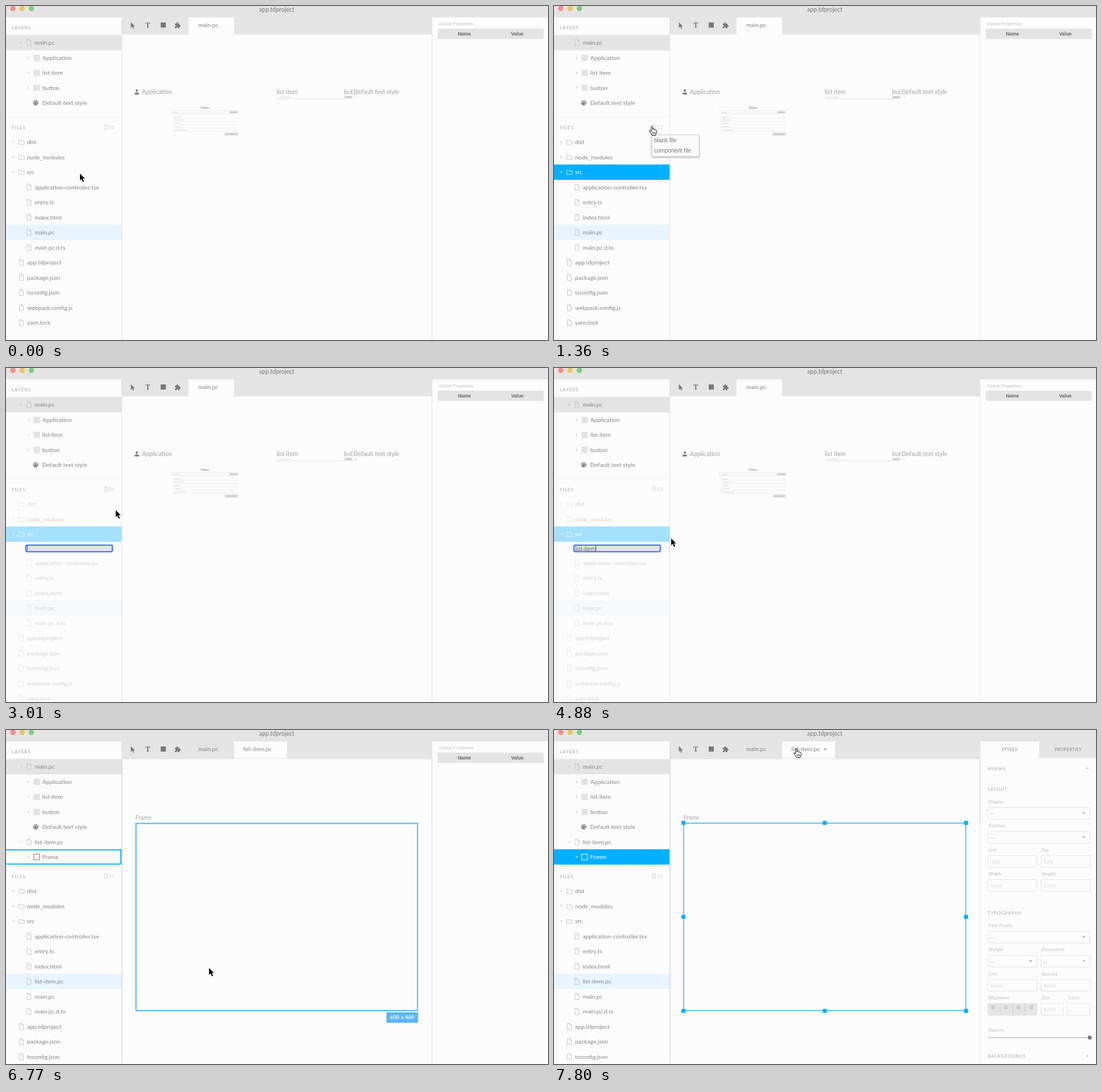
An HTML page for the animation above (8 s loop, 953x588 px).

```html
<!DOCTYPE html>
<html lang="en">
<head>
<meta charset="utf-8">
<title>Design editor</title>
<style>
  html, body { margin: 0; width: 100%; height: 100%; overflow: hidden; background: #fcfcfc; }
  svg { display: block; }
  text { font-family: Lato, sans-serif; white-space: pre; }
  .arial { font-family: "Liberation Sans", Arial, sans-serif; }
</style>
</head>
<body>
<svg id="stage" width="953" height="588" viewBox="0 0 953 588"></svg>
<script>
const LOOP = 8000, BLUE = '#00b0ff', PAPER = '#fcfcfc', BAR = '#e4e4e4', INK = '#848484';
const stage = document.getElementById('stage');

// Moments at which the interface changes
const T = { select: 360, menu: 1360, naming: 3010, created: 5240, hover: 6140, focus: 6770, picked: 6880, tab: 7600 };

// Pointer path: time, x, y
const pointerKeys = [
  [0, 130, 295], [360, 130, 295], [530, 126, 293], [750, 146, 262], [950, 163, 230], [1130, 172, 213],
  [1480, 172, 213], [1600, 174, 216], [1900, 184, 234], [2300, 193, 247], [2420, 192, 243], [2780, 193, 250],
  [3010, 193, 250], [3340, 206, 300], [5850, 206, 300], [5960, 204, 321], [6030, 204, 321],
  [6140, 250, 350], [6380, 357, 419], [6770, 357, 419], [6880, 355, 412], [7030, 354, 326],
  [7210, 346, 230], [7330, 334, 110], [7450, 350, 66], [7600, 405, 41], [7720, 426, 34], [8000, 426, 34]
];
const typedKeys = [[4060, 'li'], [4180, 'lis'], [4540, 'list'], [4650, 'list-'], [4760, 'list-it'], [4880, 'list-item']];

const rect = (x, y, w, h, fill, extra = '') => `<rect x="${x}" y="${y}" width="${w}" height="${h}" fill="${fill}" ${extra}/>`;
const box = (x, y, w, h, stroke, width = 1, fill = 'none') => rect(x, y, w, h, fill, `stroke="${stroke}" stroke-width="${width}"`);
const path = (d, stroke, fill = 'none', extra = '') => `<path d="${d}" stroke="${stroke}" fill="${fill}" ${extra}/>`;
const disc = (x, y, r, fill) => `<circle cx="${x}" cy="${y}" r="${r}" fill="${fill}"/>`;
const at = (x, y, content) => `<g transform="translate(${x} ${y})">${content}</g>`;
// y is the vertical middle of the capitals
const text = (x, y, s, size = 10.4, fill = INK, extra = '') =>
  `<text x="${x}" y="${y + size * .35}" font-size="${size}" fill="${fill}" ${extra}>${s}</text>`;
const caps = (x, y, s, size = 7.5, fill = '#a6a6a6', extra = '') => text(x, y, s, size, fill, 'letter-spacing="1" ' + extra);

// Icons are centred vertically on 0 and start at x = 0
const icons = {
  file: c => path('M1.5-5.5h4.2l2.8 2.8v8h-7zM5.7-5.5v2.8h2.8', c, 'none', 'stroke-width=".9"'),
  folder: c => path('M.5-3.5h3l1 1.5h5.5v6h-9.5z', c, 'none', 'stroke-width=".9"'),
  component: c => [[0, -5], [5.5, -5], [0, .5], [5.5, .5]].map(([x, y]) => box(x + .5, y + .5, 3.6, 3.6, c, .9)).join(''),
  frame: c => box(0, -5, 10, 10, c, 1.2),
  style: c => disc(3.5, 0, 4.6, INK) + [[1.2, -.5], [3, -2.6], [5.6, -2], [5.6, 1.8]].map(([x, y]) => disc(x, y, .9, PAPER)).join('')
};

function row(y, name, depth, icon, arrow = '', background = '') {
  const x = 37 + 13.4 * depth, bright = background === BLUE;
  const top = Math.round(y - 13.3), bottom = Math.round(y + 13.3);
  const arrowShape = { open: 'M-2.5-1.2h5l-2.5 2.8z', closed: 'M-1.2-2.5v5l2.8-2.5z' }[arrow];
  return (background && rect(0, top, 203, bottom - top, background)) +
    (arrowShape ? at(x - 24, y, path(arrowShape, 'none', bright ? '#b5e6ff' : '#ccc')) : '') +
    at(x - 15, y, icons[icon](bright ? '#d9f2ff' : icon === 'frame' ? '#888' : '#c0c0c0')) +
    text(x, y, name, 10.4, bright ? '#fff' : INK);
}

function chrome() {
  const lights = ['#fa8a85', '#e5c85a', '#79cf7a'];
  return rect(0, 0, 953, 588, PAPER) + rect(0, 0, 953, 20, BAR) +
    lights.map((c, i) => disc(12 + 16.3 * i, 4.3, 4.7, c)).join('') +
    text(476, 6, 'app.tdproject', 10.6, '#777', 'text-anchor="middle"') +
    rect(204, 20, 545, 30, '#e5e5e5');
}

function toolbar(created, overTab) {
  const [tabX, tabWidth] = created ? [401, 93] : [321, 80];
  const puzzle = 'M297 31h3c-1.5-3 3.5-3 2 0h3v3c3-1.5 3 3.5 0 2v3h-3c1-2.5-3-2.5-2 0h-3v-3c2.5 1 2.5-3 0-2z';
  return path('M219.5 28.5v10l2.3-2.2 1.7 3.7 1.7-.8-1.7-3.5h3.2z', 'none', '#777') +
    '<text x="245" y="38" font-size="13" font-weight="bold" fill="#777" style="font-family:Noto Serif,serif">T</text>' +
    rect(272, 29, 9, 9, '#777') + path(puzzle, 'none', '#777') +
    rect(tabX, 20, tabWidth, 30, PAPER) + text(338, 33.5, 'main.pc') +
    (created ? text(417, 33.5, 'list-item.pc') : '') +
    (overTab ? text(474, 33.5, '×', 10, '#777') : '');
}

function layers(t, created) {
  let out = caps(10, 38.5, 'LAYERS', 8) + row(64.7, 'main.pc', 1, 'file', 'open', BAR);
  ['Application', 'list item', 'button'].forEach((name, i) => out += row(91.2 + 26.45 * i, name, 2, 'component', 'closed'));
  out += row(170.5, 'Default text style', 2, 'style');
  if (created) {
    const picked = t >= T.picked;
    out += row(197, 'list-item.pc', 1, 'file', 'open') +
      row(223.5, 'Frame', 2, 'frame', picked ? 'open' : 'closed', picked ? BLUE : '');
    if (t >= T.hover && !picked) out += box(-2, 211, 204, 25, '#19b3f5', 2);
  }
  return out;
}

function files(t, created) {
  const top = created ? 239.5 : 195.5, naming = t >= T.naming && !created;
  const selected = t >= T.select && !created, active = created ? 'list-item.pc' : 'main.pc';
  const nested = ['application-controller.tsx', 'entry.ts', 'index.html', ...(created ? ['list-item.pc'] : []), 'main.pc', 'main.pc.d.ts'];
  const root = ['app.tdproject', 'package.json', 'tsconfig.json', 'webpack.config.js', 'yarn.lock'];
  let y = top + 44, list = '';
  const add = (...args) => { list += row(y, ...args); y += 26.5; };
  add('dist', 0, 'folder', 'closed');
  add('node_modules', 0, 'folder', 'closed');
  add('src', 0, 'folder', 'open', selected ? BLUE : '');
  if (naming) y += 24;
  nested.forEach(name => add(name, 1, 'file', '', name === active ? '#e8f4ff' : ''));
  root.forEach(name => add(name, 0, 'file'));
  const small = (x, icon) => `<g transform="translate(${x} ${top + 17.5}) scale(.75)">${icons[icon]('#c4c4c4')}</g>`;
  return path(`M0 ${top}h203`, '#ececec') + caps(10, top + 18.5, 'FILES', 8) +
    small(172, 'file') + small(182, 'folder') +
    `<g opacity="${naming ? .34 : 1}">${list}</g>` + (naming ? nameField(t) : '');
}

function nameField(t) {
  const typed = (typedKeys.filter(([start]) => t >= start).pop() || [0, ''])[1];
  const caretX = 37.5 + [...typed].reduce((w, c) => w + ({ s: .5, '-': .333, t: .278, e: .556, m: .833 }[c] || .222) * 10.5, 0);
  const caret = t < 3580 || t >= 4060;
  return rect(35, 311.8, 152, 11.5, '#e3e3e3', 'rx="2" stroke="#3f7df0" stroke-width="2.2"') +
    text(37, 318, typed, 10.5, '#777', 'class="arial"') +
    (caret ? path(`M${caretX} 312.5v10.5`, '#555') : '');
}

function todoCanvas() {
  const label = (x, s) => text(x, 151.7, s, 10.6, '#a0a0a0');
  const tiny = (x, y, s, size = 2.6) => text(x, y, s, size, '#888');
  const button = (x, y, w, s) => rect(x, y, w, 5.2, '#dcdcdc') + tiny(x + 2, y + 2.6, s, 2.5);
  const todos = ['Get food', 'Take dogs out', 'Clean car', 'Water fern', 'Pick up groceries'];
  return disc(230, 148.8, 2, '#777') + path('M230 149v4', '#777') + rect(226, 152.8, 8, 3, '#777', 'rx="1"') +
    label(239, 'Application') + label(476, 'list item') + label(594.5, 'but') + label(611, 'Default text style') +
    path('M476 163.5h119', '#ddd') + disc(478.5, 160.5, .6, '#aaa') + tiny(481.5, 160.5, 'Pick up groceries') +
    button(595, 158, 14, 'add item') + tiny(611.5, 159.8, 'Hello') +
    text(349.5, 178.5, 'Todos', 5.8, '#777', 'text-anchor="middle"') +
    box(291, 184.5, 102, 4.7, '#e0e0e0', .8) + tiny(293, 187, 'New item') + button(393, 184.2, 15, 'add item') +
    todos.map((s, i) => {
      const y = 194.7 + 5.8 * i;
      return disc(294.2, y, .5, '#bbb') + tiny(296.5, y, s) + path(`M293 ${y + 2.7}h115`, '#e6e6e6', 'none', 'stroke-width=".8"');
    }).join('') + button(384.5, 223, 23.5, 'clear completed');
}

function frameCanvas(t) {
  let out = text(227.5, 154.7, 'Frame', 10.5, '#aaa');
  if (t >= T.focus) out += path('M204.5 587V50.5H748.5V161', '#dcdcec');
  if (t >= T.picked) {
    out += box(228, 164, 496, 330, '#31b2fa', 1.5);
    for (const x of [227.5, 476, 724.5]) for (const y of [163.5, 329, 494.5])
      if (x !== 476 || y !== 329) out += rect(x - 3.5, y - 3.5, 7, 7, BLUE);
  } else if (t >= T.hover) {
    out += box(228.5, 164.5, 495, 329.5, '#50b5fa', 2) + rect(669, 497, 55.5, 18.5, '#5ab5ff', 'rx="1.5"') +
      text(696.7, 506.2, '600 x 400', 9, '#fff', 'font-weight="bold" text-anchor="middle" letter-spacing=".3"');
  }
  return out;
}

function globalProperties() {
  const heading = (x, s) => text(x, 49.3, s, 8.5, '#666', 'class="arial" font-weight="bold" text-anchor="middle"');
  return text(761, 31, 'Global Properties', 7.9, '#c4c4c4', 'class="arial"') + text(940, 31, '-', 7, '#ccc') +
    rect(759, 40, 186.5, 18, BAR, 'rx="1"') + heading(806, 'Name') + heading(899, 'Value');
}

function stylePanel() {
  const L = 763, R = 856.5, HALF = 86, FULL = 179;
  const label = (x, y, s) => text(x, y, s, 7.3, '#b4b4b4', 'letter-spacing=".5"');
  const field = (x, y, w, name, value, select) =>
    label(x + 1, y - 9.5, name) + box(x, y + .5, w, 20.5, '#e0e0e0') +
    text(x + 4, y + 11, value, 9.8, select ? '#aaa' : '#d6d6d6', `letter-spacing="${select ? 0 : .7}"`) +
    (select ? path(`M${w + x - 14} ${y + 9}h6.5l-3.25 3.5z`, 'none', '#bbb') : '');
  const plus = y => path(`M935.5 ${y}h5M938 ${y - 2.5}v5`, '#aaa', 'none', 'stroke-width=".8"');
  const tab = (x, s, fill) => text(x, 34.5, s, 7.2, fill, 'text-anchor="middle" letter-spacing=".6"');
  let out = rect(853, 20, 100, 29.5, '#e5e5e5') + tab(801, 'STYLES', '#777') + tab(904, 'PROPERTIES', '#848484') +
    caps(762.5, 68, 'MIXINS') + plus(67.5) + caps(762.5, 104, 'LAYOUT') +
    field(L, 136, FULL, 'Display', '--', true) + field(L, 178.3, FULL, 'Position', '--', true) +
    field(L, 220.6, HALF, 'Left', '0px') + field(R, 220.6, HALF, 'Top', '0px') +
    field(L, 263, HALF, 'Width', 'auto') + field(R, 263, HALF, 'Height', 'auto') +
    caps(762.5, 322, 'TYPOGRAPHY') + field(L, 354, FULL, 'Font Family', '--', true) +
    field(L, 396.3, HALF, 'Weight', '--', true) + field(R, 396.3, HALF, 'Decoration', '--', true) +
    field(L, 438.6, HALF, 'Line', 'auto') + field(R, 438.6, HALF, 'Spacing', 'auto') +
    field(L, 481, HALF, 'Alignment', '') + field(R, 481, 39, 'Size', 'auto') + field(903, 481, 39, 'Color', '') +
    rect(L, 481, HALF, 21, '#e5e5e5');
  for (let i = 0; i < 4; i++) {
    const x = 769 + 22 * i;
    if (i) out += path(`M${x - 6.5} 481v21`, '#ccc');
    [7, 4, 7, 4].forEach((w, j) => out += rect(x + (7 - w) * [0, .5, .5, 1][i], 485 + 2 * j, w, .8, '#aaa'));
  }
  return out + label(764, 528, 'Opacity') +
    rect(762.5, 540.5, 179, 2, '#ccc', 'rx="1"') + disc(942, 541.5, 3.5, '#777') +
    caps(762.5, 574, 'BACKGROUNDS') + plus(574);
}

function menu() {
  return rect(172, 227, 83, 38, '#fafafa', 'stroke="#d0d0d0" stroke-width=".8" style="filter:drop-shadow(0 1px 1.5px #0006)"') +
    text(176, 236.5, 'blank file', 10, '#777', 'class="arial"') +
    text(176, 254.5, 'component file', 10, '#777', 'class="arial"');
}

function pointer(t) {
  const i = pointerKeys.findIndex(key => key[0] > t);
  const [t0, x0, y0] = pointerKeys[i - 1], [t1, x1, y1] = pointerKeys[i];
  const k = (t - t0) / (t1 - t0);
  const hand = (t >= 1130 && t < 1600) || t >= T.tab;
  const shape = hand
    ? at(0, -1, path('M-1.2 9V1.3C-1.2-.5 1.4-.5 1.4 1.3V5.5C2-.0 4.2 4.6 4.2 6.2 4.6 4.8 6.6 5.4 6.6 7 7.2 6 8.8 6.6 8.8 8.2 8.8 11.5 7 12.5 6.8 15.5H.2C-.2 13-2.6 11.5-4 8.8-4.8 7-2.8 6.6-1.2 9z', '#000', '#fff', 'stroke-linejoin="round"') +
      path('M1.6 9.5v3.5M3.6 9.5v3.5M5.6 9.5v3.5', '#000', 'none', 'stroke-width=".8"'))
    : path('M0 0v12.2l2.8-2.6 2.2 5.1 2.1-.9-2.2-5h3.8z', '#fff', '#000', 'stroke-width="1.4" paint-order="stroke"');
  return at((x0 + (x1 - x0) * k).toFixed(1), (y0 + (y1 - y0) * k).toFixed(1), shape);
}

function scene(t) {
  const created = t >= T.created;
  return chrome() + toolbar(created, t >= T.tab) +
    layers(t, created) + files(t, created) +
    path('M203.5 20V588M749 20V588', '#e0e0e0') +
    (created ? frameCanvas(t) : todoCanvas()) +
    (t >= T.picked ? stylePanel() : globalProperties()) +
    (t >= T.menu && t < T.naming ? menu() : '') + pointer(t);
}

let shown = '';
function draw() {
  const next = scene(performance.now() % LOOP);
  if (next !== shown) stage.innerHTML = shown = next;
  requestAnimationFrame(draw);
}
draw();
</script>
</body>
</html>
```
